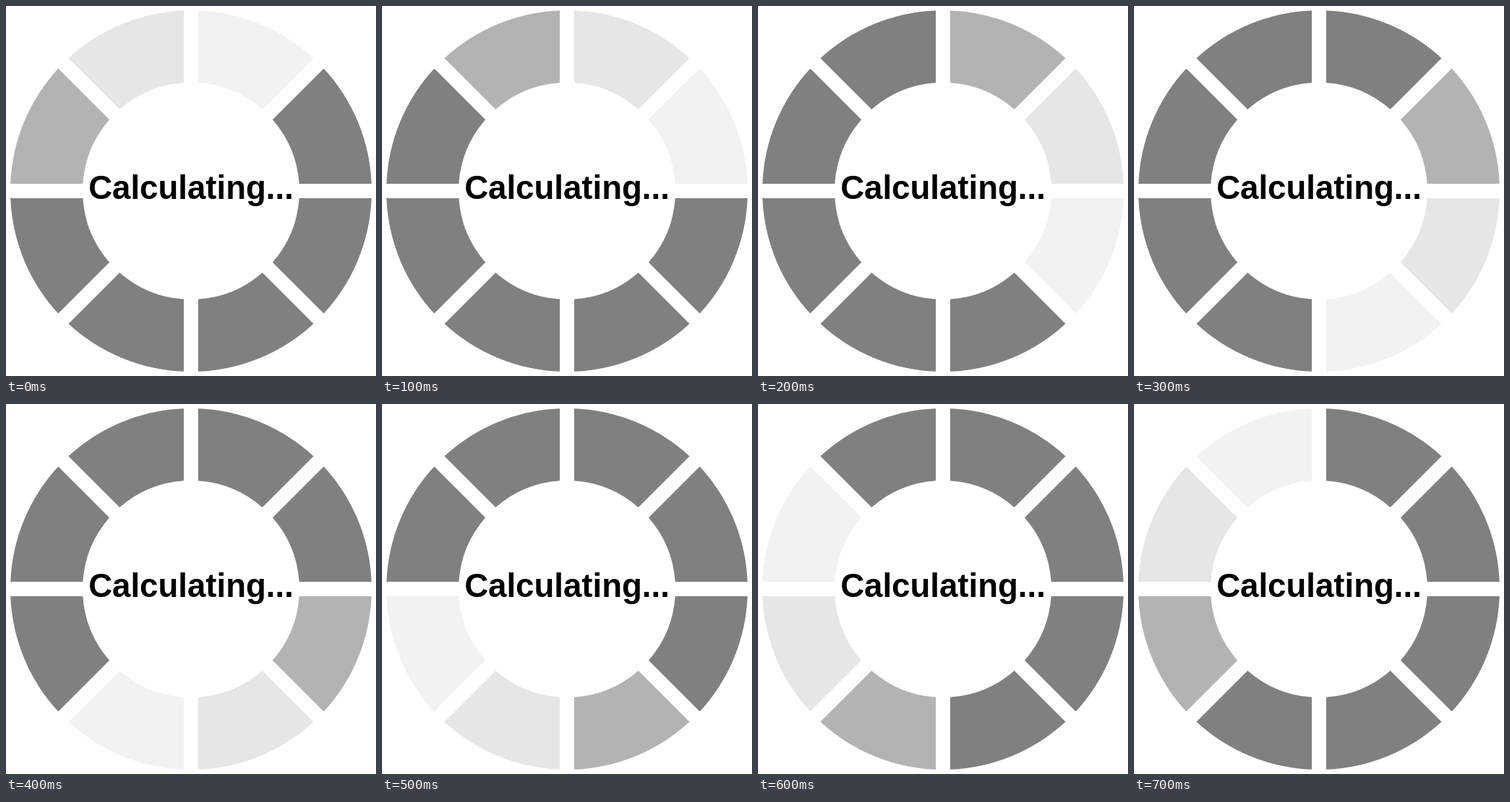
An HTML page with a canvas that plays this animation: 512x512 px, repeating every 0.8 s.

```html
<!DOCTYPE html>
<html lang="en">
<head>
<meta charset="utf-8">
<title>Calculating</title>
<style>
  html, body { margin: 0; width: 100%; height: 100%; overflow: hidden; background: #fff; }
  canvas { display: block; }
</style>
</head>
<body>
<canvas id="stage" width="512" height="512"></canvas>
<script>
const ctx = document.getElementById('stage').getContext('2d');
const CENTER = 256, OUTER = 250, INNER = 150, HALF_GAP = 10;
const COUNT = 8, STEP_MS = 100;
const SHADES = ['#f2f2f2', '#e6e6e6', '#b3b3b3'];
const BASE = '#808080';

// Insetting each arc by asin(gap / r) keeps the gaps parallel-sided.
function drawSegment(i, color) {
  const start = i * Math.PI / 4 - Math.PI / 2;
  const end = start + Math.PI / 4;
  const outerInset = Math.asin(HALF_GAP / OUTER);
  const innerInset = Math.asin(HALF_GAP / INNER);
  ctx.beginPath();
  ctx.arc(CENTER, CENTER, OUTER, start + outerInset, end - outerInset);
  ctx.arc(CENTER, CENTER, INNER, end - innerInset, start + innerInset, true);
  ctx.closePath();
  ctx.fillStyle = color;
  ctx.fill();
}

function draw(step) {
  ctx.fillStyle = '#fff';
  ctx.fillRect(0, 0, 512, 512);
  for (let i = 0; i < COUNT; i++) {
    drawSegment(i, SHADES[(step - i + COUNT) % COUNT] || BASE);
  }
  ctx.fillStyle = '#000';
  ctx.font = 'bold 45.6px "Liberation Sans", Arial, sans-serif';
  ctx.textAlign = 'center';
  ctx.fillText('Calculating...', CENTER, 267);
}

const t0 = performance.now();
function tick() {
  draw(Math.floor((performance.now() - t0) / STEP_MS) % COUNT);
  requestAnimationFrame(tick);
}
tick();
</script>
</body>
</html>
```
